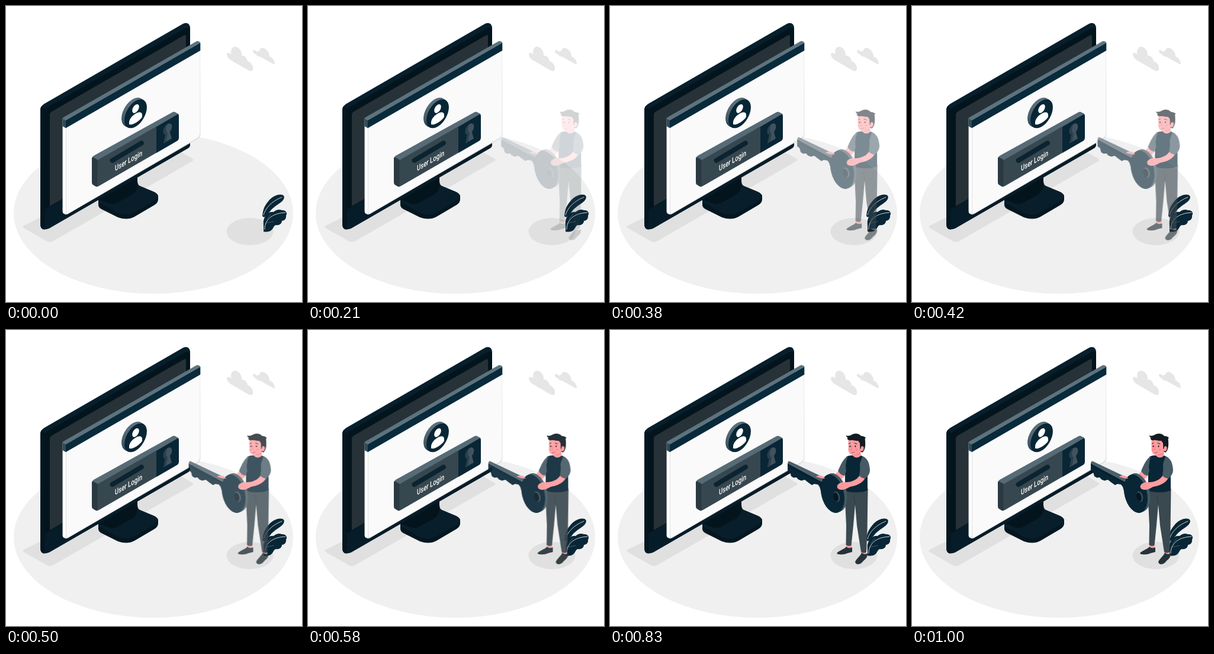
Recreate the animation shown at these times as an HTML page with a canvas. Size 500 px wide and 500 px high, loop 1.04 s.

```html
<!DOCTYPE html>
<html lang="en">
<head>
<meta charset="utf-8">
<title>User Login</title>
<style>
html, body { margin: 0; width: 100%; height: 100%; overflow: hidden; background: #fff; }
canvas { display: block; width: 500px; height: 500px; }
</style>
</head>
<body>
<canvas id="stage" width="500" height="500"></canvas>
<script>
const SIZE = 500, LOOP = 1040, FPS = 24, SLIDE = 30;
const NAVY = '#092636', DARK = '#04141d', SLATE = '#37474f', STEEL = '#455a64';
const SKIN = '#ff9c9f', HAIR = '#111c22';

const stage = document.getElementById('stage').getContext('2d');
const layer = () => {
  const c = document.createElement('canvas');
  c.width = c.height = SIZE;
  return c;
};

let g;
const fill = (d, color) => { g.fillStyle = color; g.fill(new Path2D(d)); };
const line = (d, color, width) => {
  g.strokeStyle = color;
  g.lineWidth = width;
  g.lineCap = 'round';
  g.stroke(new Path2D(d));
};
const oval = (x, y, rx, ry, color, turn = 0) => {
  g.fillStyle = color;
  g.beginPath();
  g.ellipse(x, y, rx, ry, turn, 0, Math.PI * 2);
  g.fill();
};
// Draw on the slanted plane of the screen
const onScreen = (x, y, draw, sx = 0.866) => {
  g.save();
  g.transform(sx, -sx * 0.577, 0, 1, x, y);
  draw();
  g.restore();
};

function ground() {
  const shade = '#e0e0e0';
  oval(249, 350, 236, 136, '#f0f0f0');
  fill('M30 371 Q27 373 30 375 L70 398 Q75 400 80 397 L315 262 Q318 260 315 258 L296 247 L60 356 Z', shade);
  oval(412, 381, 39.5, 23, shade);
}

function clouds() {
  const mist = '#e6e6e6';
  fill('M373 81 C374 78 379 79 381 82 C378 74 383 67 389 69 C395 71 399 78 398 84 C403 83 407 88 408 93 C414 95 418 101 417 107 C416 111 413 110 410 109 L379 91 C375 88 373 85 373 81Z', mist);
  fill('M417 76 C418 73 422 74 424 78 C425 75 427 75 428 77 C428 72 431 70 435 71 C441 73 445 79 445 85 C450 87 454 92 454 98 C452 99 450 97 448 96 L428 85 C426 86 424 85 423 82 C420 81 417 79 417 76Z', mist);
}

function monitor() {
  fill('M156 327 L156 336 Q156 340 161 343 L189 357 Q205 362.5 217 356 L251 336 Q257 332 257 327 L257 321 Q256 317 250 314 L226 304 Q222 302 222 296 L222 286 L190 300Z', '#041721');
  fill('M156 331 L190 350 Q205 355 216 349 L251 329 Q256 325 257 321 Q256 317 250 314 L226 304 Q222 302 222 296 L222 286 L190 300Z', '#081f2b');
  fill('M157 327 L175 334 Q181 336 187 333 L214 318 Q222 312 222 303 L222 284 L170 315Z', DARK);

  fill('M58 176 Q58 169 65 165 L299 30 Q309 26 311 36 L311 234 Q311 238 307 240.5 L73 375.5 Q58 382 58 368Z', '#071f2c');
  fill('M58 176 Q58 172 60 169 L66 174 L65 377.5 Q58 377 58 368Z', '#04161f');
  fill('M65 180 Q65 174 70 171 L302 38 Q310 34 311 40 L311 206 L65 346Z', DARK);
  fill('M74 184 Q74 180 78 178 L300 50 Q304 47 304 52 L304 206 L74 338Z', '#263238');
  fill('M65 344 L311 202 L311 234 Q311 238 307 240.5 L73 375.5 Q66 378.5 65 371Z', '#061c28');
}

function panel() {
  fill('M95.5 190 L101 193 L328 62 L328.5 217 Q328 221 325 223.5 L104 351.8 Q101 353 98 351 Q95.5 350 95.5 347Z', '#d9d9d9');
  fill('M96 202 L101 205 L101 351 Q96 350 96 347Z', '#fff');
  fill('M101.8 205 L327.6 74 L327.6 216 Q327 220 324 222.5 L105 350.5 Q101.8 351.8 101.8 347Z', '#fafafa');
  fill('M101 193 L328.3 62 L328.3 75.3 L101 206.3Z', '#082a3b');
  fill('M95.5 190 L101 193 L101 206.3 L95.5 203Z', '#304b58');
  fill('M95.5 190 Q96 188.6 98 187.6 L322 59.5 Q326 58.5 328.5 62 L101 193.3Z', '#5d737e');
}

function badge() {
  const r = 21.8;
  const shade = g.createLinearGradient(0, -r, 0, r);
  shade.addColorStop(0, '#5b707a');
  shade.addColorStop(0.5, STEEL);
  shade.addColorStop(1, '#17323f');
  for (let i = 5; i > 0; i -= 0.5) {
    onScreen(219 - i, 182 - i * 0.56, () => oval(0, 0, r, r, shade));
  }
  onScreen(219, 182, () => {
    oval(0, 0, r, r, NAVY);
    oval(0, -8.6, 6.7, 6.7, '#fff');
    fill('M-12.7 11.5 V8 C-12 -3 12 -3 12.7 8 V11.5 C8 16.5 -8 16.5 -12.7 11.5Z', '#fff');
  });
}

function loginBar() {
  fill('M145 258 Q145 255 148 253 L281 179.5 Q284 178 287 180 L291 182 L292 186 L155 265Z', '#566b76');
  fill('M145 257 Q145 255 148 256 L155 260 L155 305 Q153 306 150 304 L147 302 Q145 301 145 298Z', '#2b3a42');
  fill('M154.5 263 Q155 260 157 259 L254 203.5 L254 248 L157 304 Q154.5 305.5 154.5 303Z', SLATE);
  fill('M254 204 L289 183.5 Q292 182 292 186 L292 222 Q292 226 289 228 L254 248.3Z', NAVY);
  line('M179.5 261 L229 231.5', '#0b2431', 8);

  onScreen(273, 211, () => {
    fill('M-8.5 -3 A8.5 8.5 0 1 1 4.5 4 L8 17 L-8 17 L-4.5 4 A8.5 8.5 0 0 1 -8.5 -3Z', '#40535e');
    fill('M-8.5 -3 A8.5 8.5 0 0 1 -1 -11 C-4 -6 -4 0 0 4 L-3 17 L-8 17 L-4.5 4 A8.5 8.5 0 0 1 -8.5 -3Z', '#2a404c');
  });
  onScreen(184, 279, () => {
    g.fillStyle = '#fff';
    g.font = '500 13.5px Roboto, "Liberation Sans", sans-serif';
    g.fillText('User Login', 0, 0);
  }, 0.71);
}

function plant() {
  fill('M433 355 C434 345 436 338 443 330 C450 321 460 317 467 319 C472 321 470 327 465 331 C457 337 450 341 446 347 L436 357Z', NAVY);
  fill('M435 381 C436 371 433 364 437 357 C440 350 447 347 452 348 C456 344 462 343 466 345 C473 344 476 350 473 354 C474 359 470 363 466 363 C466 368 461 371 456 370 C452 371 452 375 449 378 C445 382 439 382 435 381Z', NAVY);
  line('M435 353 C438 342 448 330 466 323', '#fff', 0.8);
  line('M437 377 C437 362 448 350 472 349', '#fff', 0.8);
  line('M441 360 L447 352 M438 367 L452 364', '#9fadb4', 0.4);
}

function legs() {
  fill('M402 360 L410 360 L411 371 L402 371Z M427 372 L436 372 L436 382 L428 382Z', SKIN);
  fill('M402 366 C398 371 390 372 386 377 C387 380 398 380 404 377 L412 375 L412 367 Q406 370 402 366Z', '#263238');
  fill('M428 376 C426 382 419 386 417 392 C418 397 426 397 430 391 C434 387 438 385 438 377 Q433 381 428 376Z', '#263238');
  fill('M400 268 L400.5 300 L402 330 L401.5 363 Q405 366 410.5 364 L414 330 L417 295 L420 330 L427 375 Q432 378 436 375 L437.5 340 L438.5 268Z', '#3a484f');
  line('M417 295 L415 280', '#2b383f', 0.8);
}

function torso() {
  fill('M391 236 L377 251 L388 257 L400 246Z', SKIN);
  fill('M414 204 L426 204 L427 213 Q421 222 412 214Z', SKIN);
  fill('M402 214 Q409 211 413 212 Q419 219 427 212 L433 215 C437 219 438 230 438 240 L438 271 Q421 277 400 272 L400 240Z', NAVY);
  fill('M405 213 C397 217 393 227 388 238 Q392 245 399 246 L402 238 C400 228 402 220 405 213Z', STEEL);
}

function head() {
  fill('M425 180 L433 181 C435 190 435 203 429 207 L424 204Z', HAIR);
  fill('M405.5 184 L405.5 202 C406 208 409 212 416 211 C422 210 426 207 427 202 L427 184Z', SKIN);
  oval(428.5, 200.5, 3, 4.3, SKIN, 0.2);
  fill('M417 210 Q423 210 426 206 L426 209 Q421 213 415.5 211Z', '#ef858b');
  fill('M402 178 C406 180 409 178 413 176 C418 174 424 175 427 179 C430 179 433 180 435 182 Q432 184 434 188 C434 192 433 195 431 196 Q427 194 427 199 L425.5 202 L425 191 L422 187 C418 188 412 185 409 186.5 C406 186.5 404 185 403.5 183 L405 182 Q402 181 402 178Z', HAIR);
  oval(408.5, 196.5, 1, 1.4, HAIR);
  oval(417.5, 196.5, 1, 1.4, HAIR);
  line('M406.5 192 L409 191 M416 191 L420 192.5', HAIR, 1);
  line('M412 196 L410.5 202 L412.5 202.5', '#e2727a', 0.8);
  line('M411 207 Q414 208 416 206', '#9c4149', 0.8);
  oval(420, 202, 2.4, 1.8, '#fa858c');
  oval(407.5, 202, 1.5, 1.6, '#fa858c');
}

function key() {
  const tilt = -0.24;
  for (let i = 10; i >= 0; i--) oval(379 + i * 0.44, 276.5 - i * 0.2, 19, 33, STEEL, tilt);
  fill('M303 225 L366 259 L366 278 L359 272 L357 265 L354 261 L348 260 L344 262 L337 257 L332 253 L326 254.5 L321 252.5 L318 249 L313 249.5 L309 247 L307 240 L303 237Z', NAVY);
  fill('M303 225 L304.5 221.5 Q306 221 309 223 L368 251 L366 259Z', '#4b606b');
  line('M310 233 L360 259', '#061c28', 1.2);
  oval(379, 276.5, 19, 33, NAVY, tilt);
  oval(385.5, 281.5, 5.5, 9, '#3c515c', tilt);
  oval(384.3, 282, 4.3, 7.7, '#051822', tilt);
}

function frontArm() {
  fill('M351 248 C354 245 360 245 364 248 L366 251 L360 250.5Z', SKIN);
  fill('M425 245 L434 250 C430 258 420 263 408 265 C401 269 394 272 388 268 C385 264 387 259 396 257 C409 258 420 254 425 245Z', SKIN);
  line('M389 262 L397 261 M389 265.5 L398 264.5', '#ee858b', 0.7);
  fill('M429 214 C438 216 441 224 442 236 C442 243 438 248 434 251 Q427 250 424 246 Q426 236 425 226 Z', STEEL);
}

const scene = layer(), figure = layer();
g = scene.getContext('2d');
[ground, clouds, monitor, panel, badge, loginBar, plant].forEach(draw => draw());
g = figure.getContext('2d');
g.translate(-1, 0);
[legs, torso, head, key, frontArm].forEach(draw => draw());

// cubic-bezier(.36, -.01, .5, 1.38): slides in and overshoots
const bezier = (a, b, s) => 3 * s * (1 - s) ** 2 * a + 3 * s * s * (1 - s) * b + s ** 3;
function ease(x) {
  let lo = 0, hi = 1;
  for (let i = 0; i < 30; i++) {
    const mid = (lo + hi) / 2;
    if (bezier(0.36, 0.5, mid) < x) lo = mid; else hi = mid;
  }
  return bezier(-0.01, 1.38, (lo + hi) / 2);
}

function render(ms) {
  const tick = Math.floor(ms / 10) * 10;
  const step = Math.floor((tick + 4.9) * FPS / 1000);
  stage.globalAlpha = 1;
  stage.fillStyle = '#fff';
  stage.fillRect(0, 0, SIZE, SIZE);
  stage.drawImage(scene, 0, 0);
  if (step >= 3) {
    const p = ease(Math.min(1, (step + 0.5) / FPS));
    stage.globalAlpha = Math.min(1, p);
    stage.drawImage(figure, SLIDE * (1 - p), 0);
  }
}

const start = performance.now();
function loop() {
  render((performance.now() - start) % LOOP);
  requestAnimationFrame(loop);
}
loop();
</script>
</body>
</html>
```
